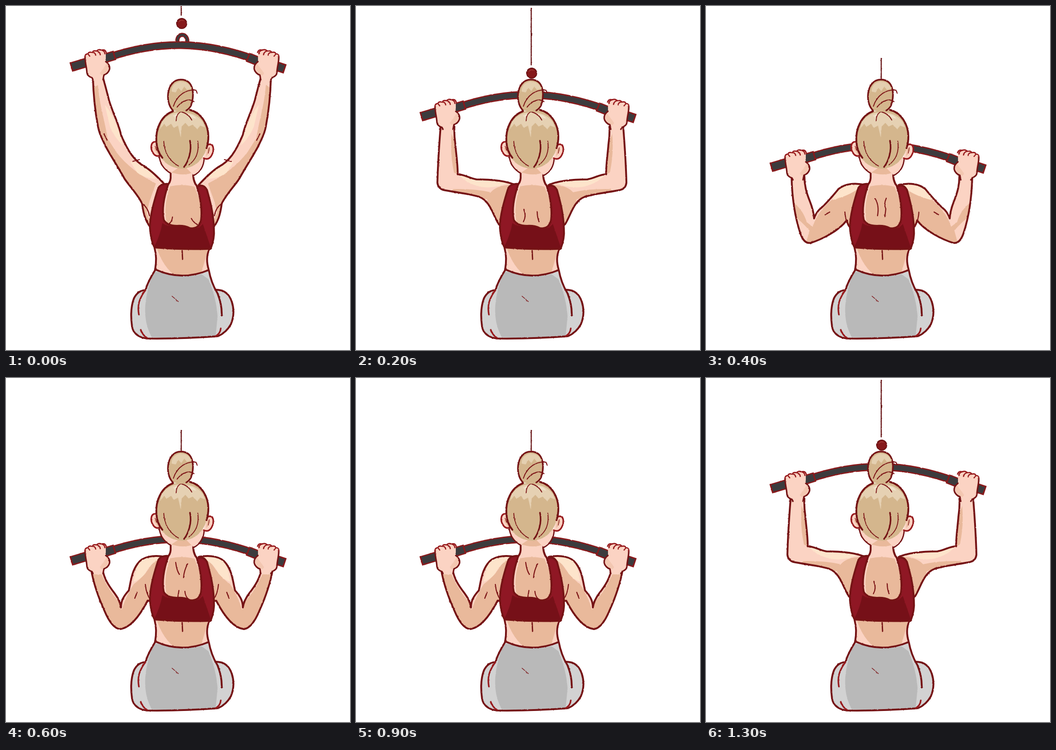
Animation, 748 px wide and 748 px high, one loop 1.5 s. Source, as an HTML page without scripts:

```html
<!DOCTYPE html>
<html lang="en">
<head>
<meta charset="utf-8">
<title>Lat pulldown</title>
<style>
html, body { margin: 0; width: 100%; height: 100%; overflow: hidden; background: #fff; }
svg { display: block; width: 100%; height: 100%; }
path { stroke-linecap: round; stroke-linejoin: round; }
.ink { fill: none; stroke: #751315; stroke-width: 4; }
.red { fill: none; stroke: #981b1e; stroke-width: 3.4; }
.thin { fill: none; stroke: #7d1517; stroke-width: 2.3; }
.skin { fill: #fbd3c3; }
.shade { fill: #e9b99b; }
.glow { fill: #fde4cb; }
.edge { fill: none; stroke: #8a191b; stroke-width: 17; }
.steel { fill: none; stroke: #3c3b3d; stroke-width: 11.5; }
.edge, .steel { stroke-linecap: butt; }

/* held poses: high, mid, low, lowest, low, mid */
.bar, .cable, .pose { animation: 1.5s step-end infinite; }
.bar { animation-name: bar; }
.cable { animation-name: cable; }
.high { animation-name: high; }
.mid { animation-name: mid; }
.low { animation-name: low; }
.deep { animation-name: deep; }
@keyframes bar {
  0% { transform: translateY(0); }
  13.3333%, 86.6667% { transform: translateY(108px); }
  26.6667%, 73.3333% { transform: translateY(218px); }
  40% { transform: translateY(265px); }
  100% { transform: translateY(108px); }
}
@keyframes cable {
  0% { transform: translateY(0); }
  13.3333%, 86.6667%, 100% { transform: translateY(108px); }
  26.6667% { transform: translateY(217px); }
}
@keyframes high { 0% { visibility: visible; } 13.3333%, 100% { visibility: hidden; } }
@keyframes mid {
  0%, 26.6667% { visibility: hidden; }
  13.3333%, 86.6667%, 100% { visibility: visible; }
}
@keyframes low {
  0%, 40%, 86.6667%, 100% { visibility: hidden; }
  26.6667%, 73.3333% { visibility: visible; }
}
@keyframes deep {
  0%, 73.3333%, 100% { visibility: hidden; }
  40% { visibility: visible; }
}
</style>
</head>
<body>
<svg viewBox="0 0 748 748">
<defs>
  <filter id="rough" filterUnits="userSpaceOnUse" x="0" y="-120" width="748" height="870" color-interpolation-filters="sRGB">
    <feTurbulence type="fractalNoise" baseFrequency=".2" numOctaves="2" seed="4"/>
    <feDisplacementMap in="SourceGraphic" scale="2.2" xChannelSelector="R" yChannelSelector="G"/>
  </filter>

  <path id="armA" d="M189 156C190 195 193 225 200 262C203 280 210 290 216 304C230 330 245 352 258 376C272 396 288 412 296 430C299 455 305 472 318 486L330 430L346 389C334 376 318 360 303 350C280 338 266 318 250 280C246 258 232 232 224 205C219 185 215 170 211 156"/>
  <path id="armB" d="M184 262C181 300 178 345 177 384Q178 396 190 400C215 405 245 408 268 415C292 424 298 455 310 474L320 484L330 430L346 389C325 380 295 377 262 377C245 374 235 366 221 366C222 350 218 325 216 300Q213 280 214 262"/>
  <path id="armC" d="M186 370C187 415 192 455 205 494Q213 518 228 515C250 508 288 490 306 466Q308 478 318 486L330 430L346 389C320 383 300 388 288 398C278 410 262 430 246 443Q238 452 235 462Q234 445 226 425C218 405 214 390 214 370"/>
  <path id="armD" d="M185 416C190 445 200 475 214 506C224 530 236 545 248 546C272 543 292 515 308 484L318 486L330 430L346 389C322 384 296 388 286 404C273 422 272 440 267 462C256 474 250 484 250 499Q248 484 236 468C222 450 213 435 210 416"/>
  <clipPath id="clipA"><use href="#armA"/></clipPath>
  <clipPath id="clipB"><use href="#armB"/></clipPath>
  <clipPath id="clipC"><use href="#armC"/></clipPath>
  <clipPath id="clipD"><use href="#armD"/></clipPath>

  <g id="A">
    <use href="#armA" class="skin"/>
    <g clip-path="url(#clipA)">
      <path class="shade" d="M185 180L200 172C203 215 214 245 221 288L240 318C262 346 290 368 326 386L312 425L306 450L322 490H295L200 300Z"/>
      <path class="glow" d="M215 215Q233 235 248 280L254 303Q235 285 226 262ZM270 338Q312 345 326 376Q300 374 285 362Z"/>
    </g>
    <use href="#armA" class="ink"/>
    <path class="thin" d="M296 430Q308 437 312 456M213 278L220 292M275 338L290 334"/>
  </g>
  <g id="B">
    <use href="#armB" class="skin"/>
    <g clip-path="url(#clipB)">
      <path class="shade" d="M208 278Q204 320 213 362L224 368L220 310ZM212 398Q260 397 293 405Q310 386 350 390V490H300L285 420L200 408Z"/>
      <path class="glow" d="M222 364Q280 377 322 380L330 385Q300 398 270 393Q235 384 222 364Z"/>
    </g>
    <use href="#armB" class="ink"/>
  </g>
  <g id="C">
    <use href="#armC" class="skin"/>
    <g clip-path="url(#clipC)">
      <path class="shade" d="M186 425Q210 440 219 470L232 480Q243 445 278 418Q308 410 325 388L350 390V490L300 500L215 525L225 488Q207 468 190 455Z"/>
      <path class="glow" d="M284 400Q300 383 342 388Q320 410 275 422Z"/>
    </g>
    <use href="#armC" class="ink"/>
    <path class="thin" d="M302 448Q304 474 315 484M259 454L269 448"/>
  </g>
  <g id="D">
    <use href="#armD" class="skin"/>
    <g clip-path="url(#clipD)">
      <path class="shade" d="M185 415H203Q219 458 246 487L252 504Q260 475 278 448Q306 428 325 390L350 390V490L290 550H220Z"/>
      <path class="glow" d="M286 404Q302 382 340 389Q312 404 303 425Q290 440 277 443Z"/>
    </g>
    <use href="#armD" class="ink"/>
    <path class="thin" d="M303 449Q305 470 314 482M285 466L280 479"/>
  </g>

  <g id="hand">
    <path class="skin" d="M190 162L188 157Q176 152 176 145C175 130 171 120 172 110Q172 104 178 104Q180 99 187 101Q190 96 197 98Q201 93 208 96Q215 93 217 100L217 121Q227 128 225 138Q222 147 213 150L210 162Z"/>
    <path class="shade" d="M204 146L220 124Q228 136 213 150Q206 152 204 146Z" opacity=".45"/>
    <path class="ink" style="stroke-width:3.3" d="M189 160L187 156Q176 152 176 145C175 130 171 120 172 110M217 121Q227 128 225 138Q222 147 213 150L211 160"/>
    <path class="red" style="stroke-width:2.6" d="M172 111Q171 104 178 104Q180 99 187 101Q190 96 197 98Q201 93 208 96Q215 93 218 101M178 104L182 109M188 101Q194 101 195 107M198 98Q204 100 205 106M208 96Q215 98 215 104"/>
  </g>
</defs>

<rect width="748" height="748" fill="#fff"/>

<g class="cable"><g filter="url(#rough)">
  <path d="M381-103V20" fill="none" stroke="#651113" stroke-width="2.4" stroke-dasharray="9 1 5 1.5"/>
</g></g>

<g class="bar"><g filter="url(#rough)">
  <circle cx="382" cy="38" r="11" fill="#85191b" stroke="#6b1113" stroke-width="2"/>
  <path d="M376 34Q381 29 386 32" fill="none" stroke="#a8403a" stroke-width="1.3"/>
  <path d="M373 80C369 57 397 57 394 80" fill="none" stroke="#8a191b" stroke-width="9"/>
  <path d="M373 80C369 57 397 57 394 80" fill="none" stroke="#3c3b3d" stroke-width="4.5"/>
  <path class="edge" d="M222 112C330 75 430 75 546 118"/>
  <path class="steel" d="M222 112C330 75 430 75 546 118"/>
  <path class="edge" style="stroke-width:21" d="M141 133L178 122M574 126L607 137M214 114L237 107M525 111L548 120"/>
  <path class="steel" style="stroke-width:15.5" d="M144 132L178 122M574 126L604 136M214 114L234 108M528 112L548 120"/>
</g></g>

<g filter="url(#rough)">
  <g class="pose high"><use href="#A"/><use href="#A" transform="translate(765) scale(-1 1)"/></g>
  <g class="pose mid"><use href="#B"/><use href="#B" transform="translate(765) scale(-1 1)"/></g>
  <g class="pose low"><use href="#C"/><use href="#C" transform="translate(765) scale(-1 1)"/></g>
  <g class="pose deep"><use href="#D"/><use href="#D" transform="translate(765) scale(-1 1)"/></g>
</g>

<g class="bar"><g filter="url(#rough)">
  <use href="#hand"/><use href="#hand" transform="translate(765) scale(-1 1)"/>
</g></g>

<g filter="url(#rough)">
  <!-- back and neck -->
  <path class="skin" d="M358 350V374Q357 384 345 390L320 480L326 545L324 574Q385 600 441 574L436 550L445 480L425 392Q408 388 408 374L406 350Z"/>
  <path class="shade" d="M357 392Q384 386 410 393L428 440V520L439 530L424 583Q390 590 364 584Q338 560 328 526L350 475Q341 435 357 392Z"/>
  <path class="shade" d="M358 352H407V362Q384 371 358 361Z"/>
  <path class="thin pose high" d="M362 459Q361 469 352 477M403 462Q408 471 416 475"/>
  <path class="thin pose mid" d="M365 443Q371 457 364 469M394 447Q394 459 398 469"/>
  <path class="thin pose low" d="M368 419Q377 434 373 456M392 418Q386 431 391 441L389 458"/>
  <path class="thin pose deep" d="M369 401Q371 418 377 427M395 404Q387 419 386 434M376 462L373 480M389 464Q390 475 396 480"/>
  <path class="ink" d="M358 360V374Q357 384 352 388M407 360Q406 381 415 391M323 526Q329 548 324 574M442 529Q433 549 441 574"/>
  <path class="ink" style="stroke-width:2.8" d="M383 532L384 551"/>

  <!-- top -->
  <path fill="#8f1724" d="M353 387Q338 385 331 396C322 425 313 455 313 482Q315 510 323 525Q380 530 445 528Q454 505 452 484C451 450 444 425 437 400Q430 386 415 392C423 415 427 445 424 466Q419 486 400 483Q388 477 372 478Q350 478 343 465C338 440 345 410 353 387Z"/>
  <path fill="#761018" d="M340 472Q350 480 372 479Q388 478 400 484Q420 486 428 474L446 527Q380 530 322 524Q335 500 340 472Z"/>
  <path class="ink" d="M353 387Q338 385 331 396C322 425 313 455 313 482Q315 510 323 525Q380 530 445 528Q454 505 452 484C451 450 444 425 437 400Q430 386 415 392C423 415 427 445 424 466Q419 486 400 483Q388 477 372 478Q350 478 343 465C338 440 345 410 353 387Z"/>

  <!-- trousers -->
  <path fill="#d2d2d2" d="M325 573Q385 600 441 574Q446 600 456 617Q482 616 492 645Q498 668 489 692Q478 711 460 718Q385 724 305 723Q278 719 274 695Q270 660 278 636Q287 618 303 618Q309 598 325 573Z"/>
  <path fill="#b9b9b9" d="M332 578Q388 594 425 583L440 594Q458 635 460 675L456 717Q385 724 317 720Q300 690 303 650Q306 612 322 579Z"/>
  <path class="ink" d="M325 573Q382 599 441 574Q446 602 460 625Q470 650 469 673M325 573Q309 598 303 618M455 617Q482 616 491 643Q499 668 489 692Q479 710 461 718Q385 724 306 723Q278 719 274 697Q269 660 278 636Q287 618 303 618"/>
  <path class="red" d="M303 618C290 636 285 650 289 671M293 704Q297 716 307 722M467 701Q466 712 456 718"/>
  <path class="thin" style="stroke-width:1.5" d="M361 631L367 636M369 638L375 643"/>

  <!-- head -->
  <path class="skin" d="M331 322Q335 350 358 363L385 345L407 367Q428 357 430 328Z"/>
  <path class="ink" style="stroke-width:2.8" d="M333 325Q335 350 357 363M431 330Q430 357 409 368"/>
  <path class="skin" d="M329 296C314 291 313 310 320 320Q326 329 335 325ZM438 302C453 296 453 314 447 325Q441 336 429 331Z"/>
  <path class="shade" d="M330 303L322 310L331 324ZM438 308L445 312L435 328Z"/>
  <path class="red" d="M329 296C314 291 313 310 320 320Q326 329 334 325M438 302C453 296 453 314 447 325Q441 336 430 331"/>
  <path class="thin" style="stroke-width:1.4" d="M324 305L328 314M442 308L440 320"/>
  <path fill="#d4b68d" d="M363 229C337 238 325 268 327 295C328 325 345 352 384 354C425 350 440 315 440 282C438 252 422 232 400 226L380 229Z"/>
  <path fill="#e6d1b3" d="M338 254Q352 232 378 231Q412 230 428 252L433 264L422 260L416 268L406 258L397 262L390 254L382 262L380 286L374 260L365 265L359 256L349 263L344 256L335 268Z"/>
  <path fill="#f0e1ca" d="M363 238L373 234L371 247ZM396 235Q407 235 414 245L404 243Z"/>
  <path class="ink" d="M363 229C337 238 325 268 327 295C328 311 334 323 340 330M400 226C425 232 440 258 440 284Q440 298 436 309"/>
  <path class="thin" style="stroke-width:1.9" d="M343 294Q345 331 375 348M417 294Q422 328 397 346M370 250Q370 235 380 230Q396 233 404 248"/>
  <path class="ink" style="stroke-width:3.4" d="M400 293C405 315 396 339 387 350"/>
  <path fill="#d4b68d" d="M363 226C345 208 350 160 380 160C412 160 409 200 402 217Q394 231 380 230Q371 230 363 226Z"/>
  <path fill="#e4cfb0" d="M360 186Q360 167 380 164Q400 166 402 180L393 182L388 175L381 185L375 178L369 188Z"/>
  <path class="ink" style="stroke-width:3.5" d="M363 227C344 208 350 160 380 160C412 160 409 200 402 217Q398 224 392 227"/>
  <path class="thin" style="stroke-width:2" d="M364 218C372 193 392 181 413 183L416 190M372 220C382 206 399 200 409 208"/>
</g>
</svg>
</body>
</html>
```
